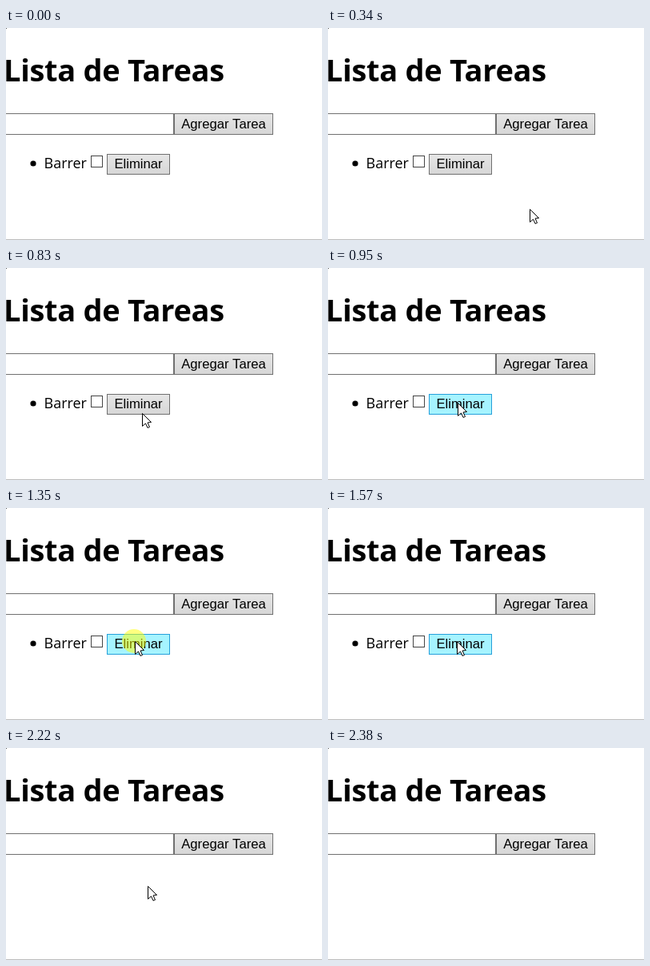
An HTML page with a canvas that plays this animation: 395 px wide and 266 px high, repeating every 3.21 s.

```html
<!DOCTYPE html>
<html lang="es">
<head>
<meta charset="utf-8">
<title>Lista de Tareas</title>
<style>
  html, body { margin: 0; width: 100%; height: 100%; overflow: hidden; background: #fff; }
  canvas { display: block; }
</style>
</head>
<body>
<canvas id="stage" width="395" height="266"></canvas>
<script>
const ctx = document.getElementById('stage').getContext('2d');
const LOOP = 3210;
const SANS = '"Open Sans", "Noto Sans", sans-serif';
const BUTTON_FONT = '16.67px "Liberation Sans", Arial, sans-serif';

const easeOut = power => p => 1 - (1 - p) ** power;
const easeIn = power => p => p ** power;

// Pointer moves; the pointer rests between them.
const moves = [
  { start: 240, end: 520, from: [319, 258], to: [180, 193], x: easeOut(1.5), y: easeOut(1.5) },
  { start: 600, end: 700, from: [180, 193], to: [173, 187], x: easeOut(1), y: easeOut(1) },
  { start: 790, end: 990, from: [173, 187], to: [161, 167], x: easeOut(1.3), y: easeOut(1.3) },
  { start: 2200, end: 2360, from: [161, 167], to: [321, 257], x: easeIn(1.1), y: easeIn(1.3) }
];

function pointerAt(t) {
  if (t < 240 || t >= 2380) return null;
  const move = moves.filter(m => m.start <= t).pop();
  const elapsed = Math.floor((t - move.start) / 20) * 20;
  const p = Math.min(1, elapsed / (move.end - move.start));
  const mix = (i, ease) => Math.round(move.from[i] + (move.to[i] - move.from[i]) * ease(p));
  return [mix(0, move.x), mix(1, move.y)];
}

function text(str, x, y, font, spacing = 0) {
  ctx.font = font;
  ctx.letterSpacing = spacing + 'px';
  ctx.fillStyle = '#000';
  ctx.fillText(str, x, y);
}

function box(x, y, w, h, fill, border) {
  ctx.fillStyle = fill;
  ctx.fillRect(x, y, w, h);
  ctx.strokeStyle = border;
  ctx.lineWidth = 1;
  ctx.strokeRect(x + 0.5, y + 0.5, w - 1, h - 1);
}

function button(label, x, y, w, h, baseline, state) {
  let fill = '#a6f4ff';
  if (state === 'idle') {
    fill = ctx.createLinearGradient(0, y, 0, y + h);
    fill.addColorStop(0, '#e6e6e6');
    fill.addColorStop(1, '#d6d6d6');
  }
  const border = state === 'idle' ? '#707070' : '#26a0da';
  if (state === 'pressed') box(x - 1, y - 1, w + 2, h + 2, fill, border);
  box(x, y, w, h, fill, border);
  ctx.textAlign = 'center';
  text(label, x + w / 2, baseline, BUTTON_FONT);
  ctx.textAlign = 'left';
}

function disc(x, y, r, color) {
  ctx.fillStyle = color;
  ctx.beginPath();
  ctx.arc(x, y, r, 0, Math.PI * 2);
  ctx.fill();
}

function task(t) {
  const state = t < 850 ? 'idle' : t >= 1380 && t < 1570 ? 'pressed' : 'hover';
  disc(34, 170, 3.6, '#000');
  text('Barrer', 47.5, 176, '18px ' + SANS);
  box(106, 160, 15, 15, '#fff', '#444');
  button('Eliminar', 126, 158, 79, 26, 176, state);
}

function pointer([x, y]) {
  const outline = [[0, 0], [0, 16], [4, 12.5], [6.5, 18], [9, 17], [6.5, 11.5], [11, 11]];
  ctx.beginPath();
  outline.forEach(([dx, dy]) => ctx.lineTo(x + dx + 0.5, y + dy + 0.5));
  ctx.closePath();
  ctx.fillStyle = '#fff';
  ctx.fill();
  ctx.strokeStyle = '#000';
  ctx.lineWidth = 1;
  ctx.stroke();
}

function draw(t) {
  ctx.fillStyle = '#fff';
  ctx.fillRect(0, 0, 395, 266);
  ctx.fillStyle = '#555';
  ctx.fillRect(0, 0, 1, 1);
  ctx.fillStyle = '#bcbcbc';
  ctx.fillRect(0, 265, 395, 1);

  text('Lista de Tareas', -3, 67, 'bold 38px ' + SANS, -0.3);
  box(-5, 107, 215, 27, '#fff', '#707070');
  button('Agregar Tarea', 210, 107, 124, 27, 126, 'idle');

  if (t < 1590) task(t);
  if (t >= 1350 && t < 1570) disc(160, 167, 15, 'rgba(255, 255, 0, 0.5)');
  const position = pointerAt(t);
  if (position) pointer(position);
}

function tick() {
  draw(performance.now() % LOOP);
  requestAnimationFrame(tick);
}
tick();
</script>
</body>
</html>
```
